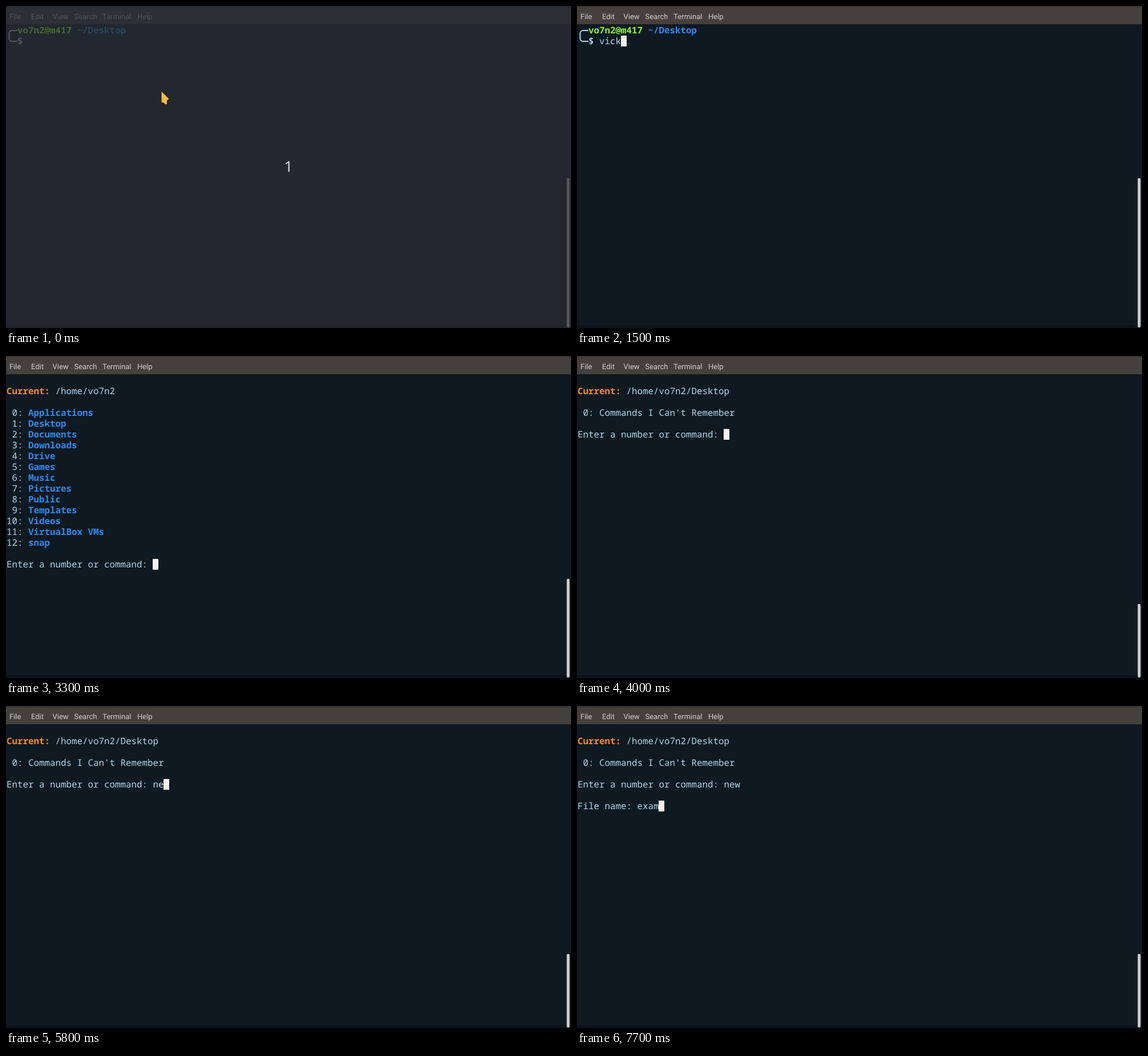
An HTML page with a canvas for the animation above (8 s loop, 990 by 565 pixels).

```html
<!DOCTYPE html>
<html lang="en">
<head>
<meta charset="utf-8">
<title>Terminal</title>
<style>
html, body { margin: 0; width: 100%; height: 100%; overflow: hidden; background: #0e1921; }
canvas { display: block; }
</style>
</head>
<body>
<canvas id="stage" width="990" height="565"></canvas>
<script>
const ctx = document.getElementById('stage').getContext('2d');
ctx.textRendering = 'geometricPrecision';

const LOOP = 8000;
const CELL = 9.5, ROW = 19, LEFT = 1, TOP = 33;
const MONO = '15.83px "Noto Sans Mono", "DejaVu Sans Mono", monospace';
const USER = 'vo7n2', HOST = 'm417';

const LIT = {
  bg: '#0e1921', edge: '#0a131e', bar: '#44403c', barTop: '#383431', menu: '#d3cfc8',
  text: '#b0d7e8', green: '#8af52c', blue: '#2b8bf0', orange: '#f78d22',
  cursor: '#f5f2f0', thumb: '#cfcecd'
};
const DIM = {
  ...LIT, bg: '#23272f', edge: '#1f232b', bar: '#2d2f36', barTop: '#26282f', menu: '#515257',
  text: '#545a63', green: '#40692f', blue: '#22485f', thumb: '#55575b'
};
const MENU = [['File', 6], ['Edit', 44], ['View', 81.5], ['Search', 119.5], ['Terminal', 169], ['Help', 230]];
const FOLDERS = ['Applications', 'Desktop', 'Documents', 'Downloads', 'Drive', 'Games', 'Music',
  'Pictures', 'Public', 'Templates', 'Videos', 'VirtualBox VMs', 'snap'];

// Each step: start time, screen, typed text, cursor shown
const STEPS = [
  [0, 'countdown', '', false],
  [500, 'shell', '', true], [600, 'shell', '', false],
  [900, 'shell', 'v', true], [1100, 'shell', 'vic', true],
  [1500, 'shell', 'vick', true], [1800, 'shell', 'vicky', true],
  [2100, 'launch', '', true],
  [2300, 'home', '', true], [2700, 'home', '', false],
  [3300, 'home', '', true], [3900, 'home', '1', true],
  [4000, 'desktop', '', true], [5000, 'desktop', '', false], [5100, 'desktop', '', true],
  [5800, 'desktop', 'ne', true], [6000, 'desktop', 'new', true],
  [6500, 'name', '', true], [6800, 'name', '', false],
  [7000, 'name', 'e', true], [7200, 'name', 'ex', true],
  [7500, 'name', 'exa', true], [7700, 'name', 'exam', true]
];

let pal = LIT;

function rect(x, y, w, h, color) {
  ctx.fillStyle = color;
  ctx.fillRect(x, y, w, h);
}

function put(col, row, str, color = pal.text, bold = false) {
  ctx.font = (bold ? 'bold ' : '') + MONO;
  ctx.fillStyle = color;
  ctx.fillText(str, LEFT + col * CELL, TOP + row * ROW + 15);
}

function block(col, row) {
  const x = Math.floor(LEFT + col * CELL);
  rect(x, TOP + row * ROW, Math.ceil(LEFT + (col + 1) * CELL) - x, ROW, pal.cursor);
}

function entry(col, row, typed, cursor) {
  put(col, row, typed);
  if (cursor) block(col + typed.length, row);
}

function windowFrame(thumbTop) {
  rect(0, 0, 990, 565, pal.bg);
  rect(0, 560, 990, 5, pal.edge);
  rect(0, 0, 990, 32, pal.bar);
  rect(0, 0, 990, 2, pal.barTop);
  ctx.font = '13px Roboto, "Open Sans", sans-serif';
  ctx.fillStyle = pal.menu;
  for (const [label, x] of MENU) ctx.fillText(label, x, 23);
  ctx.fillStyle = pal.thumb;
  ctx.beginPath();
  ctx.roundRect(982.5, thumbTop, 5, 564 - thumbTop, 2);
  ctx.fill();
}

function prompt() {
  ctx.strokeStyle = pal.text;
  ctx.lineWidth = 2;
  ctx.beginPath();
  ctx.moveTo(20, 43);
  ctx.arcTo(5.5, 43, 5.5, 52, 5);
  ctx.arcTo(5.5, 62, 20, 62, 5);
  ctx.lineTo(20, 62);
  ctx.stroke();
  put(2, 0, USER + '@' + HOST, pal.green, true);
  put(13, 0, '~/Desktop', pal.blue, true);
  put(2, 1, '$', pal.text, true);
}

function current(path) {
  put(0, 1, 'Current:', pal.orange, true);
  put(9, 1, path);
}

function question(row) {
  put(0, row, 'Enter a number or command:');
}

function arrow() {
  ctx.beginPath();
  ctx.moveTo(272.5, 150);
  ctx.lineTo(285.5, 163);
  ctx.lineTo(282, 166);
  ctx.lineTo(282, 172);
  ctx.lineTo(279, 172.5);
  ctx.lineTo(276.5, 169.5);
  ctx.lineTo(272.5, 169.5);
  ctx.closePath();
  ctx.strokeStyle = '#1b1e23';
  ctx.lineWidth = 2;
  ctx.stroke();
  ctx.fillStyle = '#f0bc42';
  ctx.fill();
}

function beam() {
  const color = '#c08a45';
  rect(271.5, 141, 2, 18, color);
  rect(268, 140, 9, 1.5, color);
  rect(268, 158.5, 9, 1.5, color);
}

const SCREENS = {
  countdown() {
    windowFrame(302);
    prompt();
    arrow();
    ctx.font = '26px "Noto Sans", sans-serif';
    ctx.fillStyle = '#d6d8da';
    ctx.textAlign = 'center';
    ctx.fillText('1', 495, 291);
    ctx.textAlign = 'left';
  },
  shell(typed, cursor) {
    windowFrame(302);
    prompt();
    if (!typed) beam();
    entry(4, 1, typed, cursor);
  },
  launch(typed, cursor) {
    windowFrame(302);
    prompt();
    put(4, 1, 'vicky');
    entry(0, 2, typed, cursor);
  },
  home(typed, cursor) {
    windowFrame(391);
    current('/home/' + USER);
    FOLDERS.forEach((name, i) => {
      put(0, 3 + i, String(i).padStart(2) + ':');
      put(4, 3 + i, name, pal.blue, true);
    });
    question(17);
    entry(27, 17, typed, cursor);
  },
  desktop(typed, cursor) {
    windowFrame(435);
    current('/home/' + USER + '/Desktop');
    put(0, 3, " 0: Commands I Can't Remember");
    question(5);
    entry(27, 5, typed, cursor);
  },
  name(typed, cursor) {
    SCREENS.desktop('new', false);
    put(0, 7, 'File name:');
    entry(11, 7, typed, cursor);
  }
};

function draw() {
  const t = performance.now() % LOOP;
  const [, screen, typed, cursor] = STEPS.findLast(step => step[0] <= t);
  pal = screen === 'countdown' ? DIM : LIT;
  SCREENS[screen](typed, cursor);
  requestAnimationFrame(draw);
}
draw();
</script>
</body>
</html>
```
